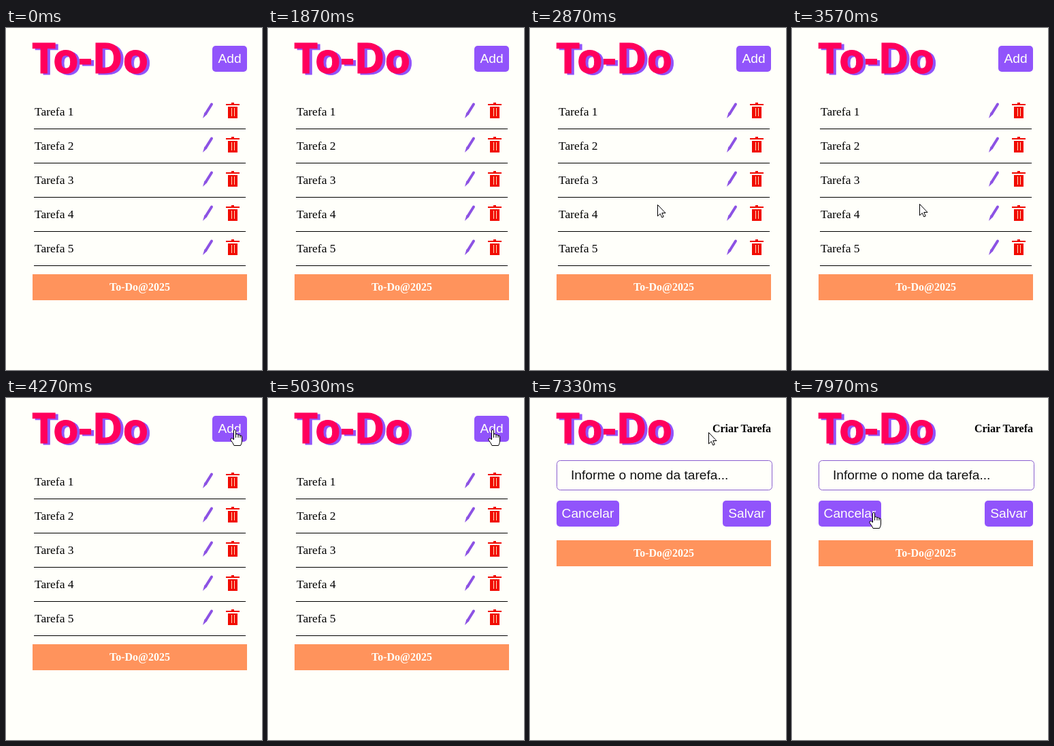
These frames come from a looping animation (376x500 px, 8 s). An HTML page:

```html
<!DOCTYPE html>
<html lang="pt">
<head>
<meta charset="utf-8">
<title>To-Do</title>
<style>
  html, body { margin: 0; height: 100%; overflow: hidden; background: #fffffa; }
  svg { display: block; }
  .logo { font: bold 61px "Open Sans", sans-serif; stroke-width: 1; }
  .sans { font: 19.2px "Liberation Sans", Arial, sans-serif; }
  .serif { font: 17.5px "Liberation Serif", "Times New Roman", serif; }
  .bold { font: bold 16px "Liberation Serif", "Times New Roman", serif; }
  .light { fill: #fffffa; }
  .mid { text-anchor: middle; }
</style>
</head>
<body>
<svg width="376" height="500" viewBox="0 0 376 500">
  <text class="logo" x="42" y="68" fill="#9154fb" stroke="#9154fb">To-Do</text>
  <text class="logo" x="38" y="65.5" fill="#ff005c" stroke="#ff005c">To-Do</text>
  <g id="list"></g>
  <g id="form"></g>
  <path id="cursor" stroke="#000" stroke-linejoin="round"/>
</svg>
<script>
const LOOP = 8000, FORM_AT = 6000;
const [list, form, cursor] = ['list', 'form', 'cursor'].map(id => document.getElementById(id));

const button = (x, y, w, label) => `
  <rect x="${x}" y="${y}" width="${w}" height="38" rx="5" fill="#9154fb"/>
  <text class="sans light mid" x="${x + w / 2}" y="${y + 25}">${label}</text>`;

const footer = y => `
  <rect x="39" y="${y}" width="315" height="38" fill="#ff935c"/>
  <text class="bold light mid" x="196.5" y="${y + 24}">To-Do@2025</text>`;

const row = n => `
  <g transform="translate(0 ${50 * n})">
    <text class="serif" x="42" y="128">Tarefa ${n + 1}</text>
    <path d="M302 111.5L293.5 125" stroke="#8c52e4" stroke-width="4" stroke-linecap="round"/>
    <path d="M291.5 123.5L289 132L295.500 126Z" fill="#8c52e4"/>
    <path d="M331 109h4v2h8v2h-20v-2h8ZM326 115h14v17h-14Z" fill="#f10a00"/>
    <path d="M331.5 117v12M335.5 117v12" stroke="#ffe0c0"/>
    <rect x="41" y="147" width="311" height="1"/>
  </g>`;

const rows = [...Array(5).keys()];
list.innerHTML = button(303, 26, 51, 'Add') + rows.map(row).join('') + footer(360);
form.innerHTML = `
  <text class="bold" x="354" y="50" text-anchor="end">Criar Tarefa</text>
  <rect x="39.5" y="91.5" width="316" height="43" rx="5" fill="none" stroke="#8a5fd0"/>
  <text class="sans" x="60" y="119" fill="#111">Informe o nome da tarefa...</text>`
  + button(39, 150, 92, 'Cancelar') + button(283, 150, 71, 'Salvar') + footer(208);

const shapes = {
  arrow: 'M.5 .5V17L4.3 13.5L6.8 19L9.2 18L6.800 12.5H12Z',
  hand: 'M-1.5 1.5Q0-1 1.5 1.5V7Q4 6 5 8Q7 7 8 9Q10.5 8 10.5 11V17Q10.5 20 8.5 23.5H-1Q-3 19-6 15.5Q-6 12-3.5 13L-1.5 15ZM1.5 7V12M5 8V12M8 9V12',
  beam: 'M-3-7.5H-1L0-6.5L1-7.5H3M0-6.5V6.5M-3 7.5H-1L0 6.5L1 7.5H3'
};

function shapeAt(x, y, onForm) {
  const over = (left, top, w, h) => x >= left && x < left + w && y >= top && y < top + h;
  if (onForm) {
    if (over(268, 36, 86, 18) || over(39, 91, 317, 44)) return 'beam';
    return over(39, 150, 92, 38) || over(283, 150, 71, 38) ? 'hand' : 'arrow';
  }
  const overIcon = n => over(288, 108 + 50 * n, 20, 25) || over(323, 108 + 50 * n, 20, 25);
  return over(303, 26, 51, 38) || rows.some(overIcon) ? 'hand' : 'arrow';
}

// The pointer joins an ellipse, circles clockwise and leaves it for a button.
// The angle is the one reached at time `mark`; `swell` widens the first turn.
const toAdd = {
  start: 1870, joined: 2150, mark: 2870, leave: 3550, end: 4270, period: 700, angle: 2.87,
  from: [376, 77], to: [336, 46], centre: [245, 237], radius: [60, 80], swell: 0.6
};
const toCancel = {
  start: 6670, joined: 6950, mark: 7330, leave: 7600, end: 7970, period: 900, angle: -0.78,
  from: [330, 46], to: [120, 167], centre: [193, 120], radius: [96, 100], swell: 0
};

function ease(from, to, t) {
  const u = Math.min(1, Math.max(0, (t - from) / (to - from)));
  return u * u * (3 - 2 * u);
}
const mix = (a, b, u) => a.map((v, i) => v + (b[i] - v) * u);

function travel(t, tour) {
  const angle = tour.angle + 2 * Math.PI * (t - tour.mark) / tour.period;
  const size = 1 + tour.swell * (1 - ease(tour.start, tour.mark, t));
  const orbit = [Math.cos(angle), Math.sin(angle)]
    .map((v, i) => tour.centre[i] + tour.radius[i] * size * v);
  const joined = mix(tour.from, orbit, ease(tour.start, tour.joined, t));
  return mix(joined, tour.to, ease(tour.leave, tour.end, t));
}

function pointerAt(t) {
  if (t >= toCancel.start) return travel(t, toCancel);
  return mix(travel(t, toAdd), toCancel.from, ease(4370, 4530, t));
}

function draw(now) {
  const t = now % LOOP, onForm = t >= FORM_AT;
  list.style.display = onForm ? 'none' : '';
  form.style.display = onForm ? '' : 'none';

  const [x, y] = pointerAt(t).map(Math.round);
  const shape = shapeAt(x, y, onForm);
  cursor.style.display = t > toAdd.start ? '' : 'none';
  cursor.setAttribute('d', shapes[shape]);
  cursor.setAttribute('fill', shape === 'beam' ? 'none' : '#fff');
  cursor.setAttribute('transform', `translate(${x} ${y})`);
  requestAnimationFrame(draw);
}
requestAnimationFrame(draw);
</script>
</body>
</html>
```
